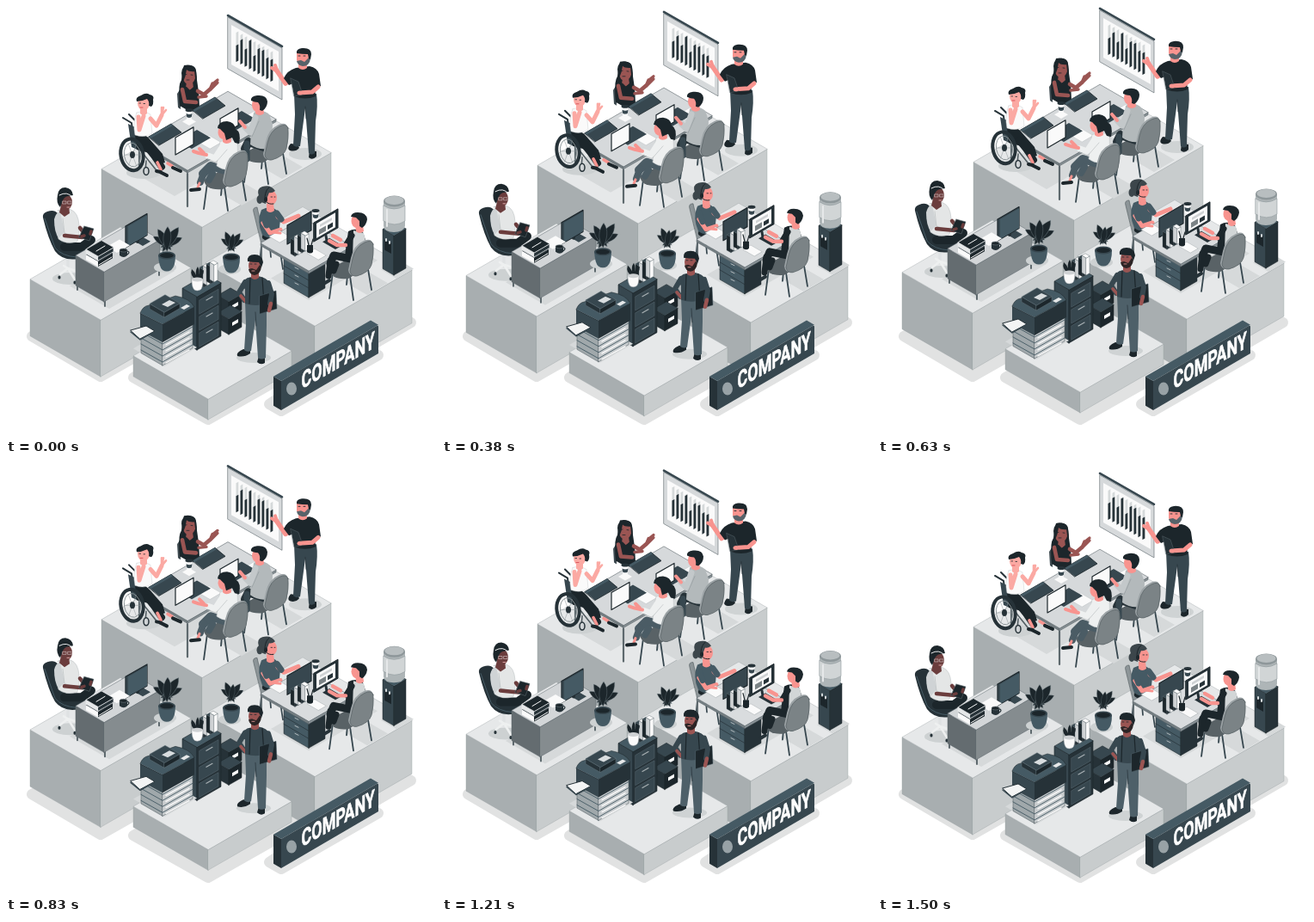
An HTML page for the animation above (1.54 s loop, 500 by 500 pixels).

```html
<!DOCTYPE html>
<html lang="en">
<head>
<meta charset="utf-8">
<title>Isometric office</title>
<style>
html, body { margin: 0; width: 100%; height: 100%; overflow: hidden; background: #fff; }
svg { display: block; width: 100%; height: 100%; }
text { font: 700 27px Roboto, Arial, sans-serif; fill: #fff; stroke: #fff; stroke-width: .7; }
</style>
</head>
<body>
<svg viewBox="0 0 500 500" stroke-linecap="round" stroke-linejoin="round">
  <g id="ground"></g>
  <g id="office"></g>
  <g id="sign"></g>
</svg>
<script>
const K = 0.577; // isometric slope
const INK = '#1c262b', DARK = '#263238', MID = '#37474f', SLATE = '#455a64', GREY = '#7b8386';
const PALE = '#e6e8e9', SOFT = '#cfd2d4', WHITE = '#fafafa', ROSE = '#f8948f', BLUSH = '#fba9a3', TAN = '#9a5553', BROWN = '#6b3d3d';
const FLOOR = [PALE, '#a8aeb0', '#c8cccd'], COAL = [SLATE, MID, DARK], STEEL = ['#d3d6d8', '#646c70', '#858c8f'];

let out = '';
const shape = (fill, d, more = '') => out += `<path fill="${fill}" d="${d}" ${more}/>`;
const line = (color, w, d) => shape('none', d, `stroke="${color}" stroke-width="${w}"`);
const oval = (fill, x, y, rx, ry = rx, more = '') => out += `<ellipse fill="${fill}" cx="${x}" cy="${y}" rx="${rx}" ry="${ry}" ${more}/>`;
// Faces start at their front corner: a runs up-left, b runs up-right, h runs down.
const flat = (fill, x, y, a, b, more) => shape(fill, `M${x} ${y}l${-a} ${-a * K} ${b} ${-b * K} ${a} ${a * K}z`, more);
const left = (fill, x, y, a, h, more) => shape(fill, `M${x} ${y}l${-a} ${-a * K}v${h}l${a} ${a * K}z`, more);
const right = (fill, x, y, b, h, more) => shape(fill, `M${x} ${y}l${b} ${-b * K}v${h}l${-b} ${b * K}z`, more);
function box(x, y, a, b, h, [top, side, front], more) {
  left(side, x, y, a, h, more);
  right(front, x, y, b, h, more);
  flat(top, x, y, a, b, more);
}
const block = (x, y, a, b, h) => box(x, y, a, b, h, FLOOR, 'stroke="#9aa1a4" stroke-width=".4"');
const shadow = d => shape('#e1e2e2', d, 'stroke="#e1e2e2" stroke-width="12"');
const shade = (x, y, a, b) => flat('#d6d9da', x, y, a, b);
const at = (x, y, draw) => { out += `<g transform="translate(${x} ${y})">`; draw(); out += '</g>'; };
function mount(id, draw) {
  out = '';
  draw();
  document.getElementById(id).innerHTML = out;
}

const seat = (x, y) => at(x, y, () => {
  shade(-6, 64, 26, 24);
  line(MID, 1.8, 'M-46 38l-4 30M-26 42l4 28M-5 34l4 24M-28 30l-2 22');
  shape('#596266', 'M-50 34l26-14 18 12-22 13q-20 2-22-11z');
});
const back = (x, y) => at(x, y, () => {
  shape('#9ba2a5', 'M1 5Q-1-3-10 1Q-22 6-25 21L-28 35Q-27 43-18 42Q-4 38-1 29Q2 17 1 5z');
  shape(GREY, 'M1 5Q-1-1-9 3Q-20 8-23 22L-26 36Q-25 43-18 42Q-4 38-1 29Q2 17 1 5z', 'stroke="#4e585c" stroke-width=".6"');
});

// Potted plant with leaves fanned out around the stem base.
function plant(x, y, leaves) {
  oval('#cdd1d2', x - 2, y + 27, 13, 6);
  for (const [turn, size] of leaves)
    shape(INK, 'M0 10C-4 2-9-10 2-24C9-14 6-2 0 10z', `transform="translate(${x} ${y}) rotate(${turn}) scale(${size})" stroke="#829096" stroke-width=".4"`);
  shape(SLATE, `M${x - 10} ${y + 13}q1 14 5 17 5 3 10 0 5-4 5-17z`);
  oval(MID, x, y + 13, 10, 4.5);
  oval(INK, x, y + 13, 8, 3);
}

function cup(x, y) {
  shape(WHITE, `M${x - 4} ${y}l1.4 11q2.6 2 5.2 0l1.4-11z`);
  shape(MID, `M${x - 3.5} ${y + 4}l.7 4q2.8 2 5.6 0l.7-4q-3 2-7 0z`);
  oval(DARK, x, y, 4.5, 2);
}

function binders(x, y, h) {
  for (let i = 0; i < 4; i++)
    box(x + 4 * i, y - 2 * i, 5, 4, h, i % 2 ? [WHITE, SOFT, WHITE] : [MID, INK, DARK], 'stroke="#59656a" stroke-width=".4"');
}

function board() {
  shape('#d6d9db', 'M258 13l63 36v60l-63-36z', 'stroke="#6e787c" stroke-width=".7"');
  shape(WHITE, 'M262 22l55 31v46l-55-31z');
  [19, 28, 20, 33, 18, 29, 30, 24, 25].forEach((h, i) => {
    const x = 267.5 + 5 * i, y = 65 + 5 * K * i;
    right('#d5d9da', x, y - 34, 2.8, 34);
    right(DARK, x, y - h, 2.8, h);
  });
  line(MID, 2.6, 'M258 11L321 47');
}

function presenter() {
  oval('#cfd3d4', 348, 172, 19, 7);
  shape(INK, 'M331 160l8 1 2 4q-4 5-11 3-4-2 1-8zM353 168l8 1 0 6q-5 5-9 1z');
  shape(MID, 'M335 102h26q2 14-1 32l-1 37q-4 3-7 0l-4-52-6 44q-5 2-8-1l2-36z');
  line(DARK, .8, 'M348 117l1 14');
  line(ROSE, 5.5, 'M331 86l-6 4-11-16');
  line(ROSE, 4, 'M315 75l-2-6M314 75l-5-3');
  shape(INK, 'M337 72l16-2q9 2 11 9l2 14-7 3 1 9q-12 5-25 0l1-16-7 3-6-8q4-9 14-12z');
  shape(ROSE, 'M340 66h10v6q-5 4-10 0z');
  line(ROSE, 5, 'M363 94l-7 6-15 1');
  shape(DARK, 'M331 84l9 4 5 15-10 2z', 'stroke="#5b676c" stroke-width=".5"');
  oval(ROSE, 342, 101, 3.5, 2.5);
  shape(ROSE, 'M338 54h15v10q-6 8-12 4l-3-5z');
  shape('#58636a', 'M338 64l5-1 4 2 5-5 2 1q-1 9-9 9-6-1-7-6z');
  shape(INK, 'M338 55q-1-5 6-6 11-1 11 7l-1 6-2-1-1-5q-7 0-13-1z');
  line(INK, .9, 'M340 58h2M346 58h2');
}

function listener() {
  shape('#3f4b51', 'M199 102l4-6v24l-3-2z');
  shape(INK, 'M207 69q8-2 13 3 2 5 2 14l2 14-10 8-12-2q-2-14 2-20 1-12 3-17z');
  shape(TAN, 'M206 74q7-3 13 1l1 9q-2 7-8 7-5-1-6-7z');
  shape(TAN, 'M210 88h7l1 7-5 3-4-3z');
  shape(INK, 'M204 78q0-8 8-9 8-1 9 7-8 1-11-2-1 8-4 14z');
  shape(INK, 'M203 93l7 1 4 4 4-4 6 3 1 21-9 6-14-8q-2-15 1-23z');
  line(TAN, 4.6, 'M223 99l7 4 7-6M205 97l3 14 13 1');
  line(TAN, 3.2, 'M237 97l3-7M238 97l8-8M237 97l6-8M241 90l5-4');
  line(TAN, 3.4, 'M224 106l9-1');
  line(INK, .8, 'M208 80l2-.6M215 80l2 .3M210 86h3');
}

function wheelchair() {
  oval('#cdd1d2', 160, 194, 20, 7);
  line(DARK, 2, 'M136 130l10 6 3 24M143 126l8 8');
  line('#525d62', 1.6, 'M150 160l16 20 8 10M163 180l-1 12');
  shape(MID, 'M142 137l8 4 5 27-9-4z');
  shape(INK, 'M150 150q10-4 18 6l14 16 3 10-6 2-9-12-18-5z');
  line(INK, 8, 'M164 164l8 10 9 13');
  line(ROSE, 3.6, 'M176 182l4 8M188 183l5 3');
  line(INK, 4, 'M180 193l-5-1M194 188l9 4M187 197l-8-4');
  shape(WHITE, 'M152 124q8-3 16 2l2 22q-9 6-20 2-3-15 2-26z', 'stroke="#cdd1d3" stroke-width=".5"');
  line(BLUSH, 5, 'M154 129l1 15 5-16M168 131l7 8 6-12');
  line(BLUSH, 2.6, 'M160 128l1-5M181 127l2-9M181 127l5-6M181 126l0-8');
  shape(BLUSH, 'M156 118h8v7q-4 4-8 0z');
  oval(BLUSH, 160, 113, 7, 8.5);
  shape(INK, 'M152 111q-2-5 5-7 6-4 10-1 6 1 4 6 1 5-2 8l-3-1q1-5-2-8-6 3-12 3z');
  line(INK, .8, 'M155 113h1.5M160 113.5h1.5');
  line('#d74f57', .9, 'M156 118h3');
  oval('none', 146.5, 173, 13, 18.5, `stroke="${DARK}" stroke-width="4" transform="rotate(-10 146 173)"`);
  oval('none', 147, 173, 9.5, 14, 'stroke="#8a9396" stroke-width=".9" transform="rotate(-10 147 173)"');
  for (let i = 0; i < 6; i++) line('#8a9396', .5, `M147 173l${9 * Math.cos(i * 1.047)} ${14 * Math.sin(i * 1.047)}`);
  oval(DARK, 147, 173, 3, 4);
  oval('#cfd3d5', 163, 192, 3, 4.5, `stroke="${DARK}" stroke-width="1.5"`);
}

function laptop(x, y) {
  flat(MID, x + 19, y + 11, 16, 22);
  right(WHITE, x, y - 2, 21, 20, `stroke="${INK}" stroke-width="1.2"`);
}
function darkLaptop(x, y) {
  shape(MID, `M${x - 20} ${y - 2}l26-15 12 10-26 15z`, `stroke="${INK}" stroke-width=".8"`);
  shape(SLATE, `M${x - 20} ${y - 2}l26-15 2 2-26 15z`);
}

function meetingTable() {
  line('#5e696e', 2.2, 'M155 162v30M211 195v38M262 162v26M300 140v22');
  box(211, 191, 56, 103, 3, ['#d6d9db', '#737d81', '#868f93'], 'stroke="#5e696e" stroke-width=".6"');
  darkLaptop(186, 154);
  darkLaptop(237, 123);
  cup(213, 121);
  flat(WHITE, 213, 139, 8, 8);
  flat(WHITE, 237, 166, 14, 13, 'stroke="#b9bec0" stroke-width=".4"');
  flat(WHITE, 285, 137, 11, 14, 'stroke="#b9bec0" stroke-width=".4"');
  laptop(197, 155);
  laptop(249, 133);
}

function colleague() {
  seat(327, 137);
  line(DARK, 10, 'M300 164l-18-6-4 8');
  line(MID, 7, 'M280 160l0 18');
  line(INK, 4, 'M278 183l-6 2');
  shape('#b3b9bb', 'M288 124q10-5 18 2l4 11-1 28q-14 4-25-4l1-16z');
  line('#c3c8ca', 7, 'M290 130l-6 17-6-6');
  line(ROSE, 4, 'M278 141l-6-7');
  line('#8f979a', .6, 'M294 134l-8 18');
  shape(ROSE, 'M290 117h9l1 8q-5 4-10 0z');
  oval(ROSE, 292, 115, 6, 8);
  shape(INK, 'M285 110q-1-5 7-6 11-1 12 7 0 7-6 11l-3-1q1-6-2-9-4 0-8-2z');
  back(327, 137);
}

function typist() {
  seat(280, 168);
  line('#4b5c65', 10, 'M258 192l-20-6-9 9');
  line('#4b5c65', 8, 'M230 194l-4 11M240 195l-4 7');
  line(ROSE, 3, 'M225 206l-2 5');
  line(INK, 4, 'M225 213l-10 1');
  shape('#eef0f0', 'M249 158q11-7 20 2l1 28q-14 6-25-2z', 'stroke="#b5bbbd" stroke-width=".4"');
  line('#eef0f0', 7, 'M252 163l-9 14-8-3');
  line('#b5bbbd', .6, 'M257 167l-13 15-10-4');
  line(ROSE, 4, 'M233 173l-9-2-6-2M230 171l-5-5');
  shape(ROSE, 'M252 149h9l1 9q-6 4-10 0z');
  oval(ROSE, 253, 147, 6.5, 8);
  shape(INK, 'M246 142q1-8 11-8 9 1 10 9 7 4 4 17l-5-1-3-6-7 3-2-8-5-5z');
  back(280, 168);
}

function meeting() {
  block(228, 257, 117, 150, 130);
  shade(196, 221, 50, 90);
  board();
  presenter();
  listener();
  meetingTable();
  wheelchair();
  colleague();
  typist();
}

function receptionist() {
  oval('#cdd1d2', 74, 317, 20, 7);
  line('#dfe2e3', 3.5, 'M72 287v20');
  line('#eef0f0', 2.6, 'M72 305l-9 7M72 305l8 13M72 305l12 4M72 305l-5-3');
  line(DARK, 3, 'M62 315v1M80 321v1M85 311v1');
  shape(DARK, 'M43 246q-1-5 5-7 8-3 12 2l10 35 22 6q2 8-8 12-18 3-27-9-8-14-14-39z');
  line(SLATE, 1, 'M45 247l12 34q8 10 25 11');
  line(INK, 10, 'M68 280l20 0 11-8');
  shape('#e4e6e6', 'M60 238q12-5 19 1 7 6 6 24l-2 11q-13 4-22-3-5-18 1-33z', 'stroke="#b9bfc1" stroke-width=".5"');
  shape('#cfd3d5', 'M56 248q2-8 7-9l5 24-7 7q-5-8-5-22z');
  line('#b9bfc1', .7, 'M66 247l2 17 9 3');
  line(BROWN, 4.5, 'M68 267l21 2M86 258l4 5');
  shape(INK, 'M91 256l11 3-5 14-12-4z', 'stroke="#59656a" stroke-width=".6"');
  line(BROWN, 3.5, 'M99 262l-1 3M88 268l3-1');
  shape(BROWN, 'M64 232h9l1 9-6 4-6-5z');
  oval(BROWN, 70, 228, 7, 9);
  shape(INK, 'M60 220q1-9 9-9 8 1 9 9l-5 1q-6 0-8 8l-2 5q-5-5-3-14z');
  line('#e8eaeb', 1, 'M62 220q9-5 15 2');
  line('#d5c6c6', .6, 'M66 227h4v3h-4zM72 227h4v3h-4z');
  line('#d9a0a0', 1, 'M71 234h3');
}

function reception() {
  block(110, 365, 82, 105, 66);
  shade(120, 352, 46, 76);
  receptionist();
  line('#5e696e', 2, 'M83 322v8M115 342v7M178 306v7');
  box(114, 309, 33, 65, 35, STEEL, 'stroke="#5e696e" stroke-width=".5"');
  flat(MID, 159, 279, 12, 9);
  line(DARK, 4, 'M153 274v-8');
  right(MID, 139, 256, 25, 25, `stroke="${INK}" stroke-width="1.2"`);
  right(SLATE, 142, 256, 22, 23);
  flat(WHITE, 129, 287, 12, 15);
  box(107, 297, 14, 17, 6, [DARK, WHITE, INK]);
  box(107, 291, 14, 18, 5, [INK, PALE, DARK], 'stroke="#e8eaeb" stroke-width=".7"');
  line(WHITE, 1, 'M105 285l10-6M108 301l15-9');
  shape(DARK, 'M132 284h9v6q-4 4-9 0z');
  oval(INK, 136.5, 284, 4.5, 2, 'stroke="#6e797e" stroke-width=".6"');
  line(DARK, 1.2, 'M141 285q4 1 0 4');
  plant(187, 277, [[-66, .75], [62, .8], [-36, .85], [30, 1], [-2, .85]]);
}

function caller() {
  line(MID, 1.7, 'M298 268l-3 30M318 280l4 26M306 270l2 22');
  shape('#8d9598', 'M288 240q-2-6 4-6l7 32 20 8-8 8-14-6z', 'stroke="#4e585c" stroke-width=".6"');
  line(INK, 8, 'M302 268l18 8-2 10');
  shape(SLATE, 'M297 237q11-6 18 1l4 10-2 20q-12 4-19-2-7-16-1-29z');
  line(ROSE, 5, 'M316 245l7 6 17-7M299 252l8 12 12-4');
  line(SLATE, 7, 'M315 241l5 7M299 245l4 10');
  shape(ROSE, 'M303 230h8l1 8q-5 4-9 0z');
  oval(ROSE, 308, 223, 7, 8.5);
  shape('#3c464b', 'M294 221q-3-9 4-11 10-3 15 5-4 3-7 2l-2 5-2 8q-8-2-8-9z');
  oval('#3c464b', 295, 225, 3.5, 5);
  line(INK, 1, 'M301 222q1-9 5-11M303 228q3 3 8 2');
  oval(INK, 302, 225, 2, 3);
  line(INK, .8, 'M308 222h1.5M312 222h1');
}

function worker() {
  seat(426, 272);
  line(INK, 9, 'M401 294l-20-4-4 10');
  line(INK, 7, 'M377 296l-2 18M384 300l-3 8');
  line(DARK, 4, 'M376 319l-5 3');
  shape(INK, 'M398 262q9-5 17 1l4 12-2 20q-12 4-23-5z');
  shape('#d2d6d7', 'M404 261l12 3 3 14-2 17q-8 3-14-2z');
  line(INK, 7, 'M402 267l-6 10');
  line(ROSE, 4.4, 'M395 278l-10 0-9-5M389 272l-9-5');
  shape(ROSE, 'M406 254h9l1 8q-5 4-9 0z');
  oval(ROSE, 408, 250, 6.5, 8);
  shape(INK, 'M401 245q1-5 8-5 10 0 11 8-1 7-6 10l-3-2 0-6-4-4z');
  back(426, 272);
}

function cooler() {
  shade(454, 317, 18, 20);
  box(451, 267, 13, 14, 46, COAL, `stroke="${INK}" stroke-width=".5"`);
  left(INK, 448, 276, 8, 12);
  line('#d5dadc', 2, 'M442 271v2M446 274v2');
  shape('#aeb5b7', 'M439 227v29q1 7 12 7t13-7v-29z');
  shape('#d1d5d6', 'M439 232q12 8 25 0v18q-12 8-25 0z', 'stroke="#8e979a" stroke-width=".6"');
  oval('#8e979a', 451.5, 227, 12.5, 6.5);
  oval('#b8bec0', 451.5, 226, 11, 5);
  line(PALE, 2, 'M443 237v19');
}

function workstation() {
  block(359, 372, 127, 113, 62);
  shade(352, 342, 44, 80);
  plant(262, 279, [[-60, .6], [58, .65], [-28, .75], [30, .75], [4, .6]]);
  cooler();
  caller();
  line('#5e696e', 2, 'M297 279v17M401 283v22M350 262v30');
  box(352, 310, 29, 19, 29, [MID, SLATE, DARK], `stroke="${INK}" stroke-width=".5"`);
  line(DARK, .7, 'M323 302l29 17M323 311l29 17');
  line(SOFT, .8, 'M336 304l4 2M336 313l4 2M336 322l4 2');
  box(352, 308, 56, 50, 3, ['#d9dcde', '#747e82', '#8b9498'], 'stroke="#5e696e" stroke-width=".5"');
  flat(WHITE, 318, 275, 12, 12, 'stroke="#9aa2a5" stroke-width=".4"');
  line(ROSE, 3, 'M310 263l9 1');
  cup(360, 238);
  right(DARK, 358, 252, 28, 22, `stroke="${INK}" stroke-width="1"`);
  right(WHITE, 361, 253, 22, 17);
  right(SOFT, 365, 254, 14, 3);
  right(GREY, 364, 260, 8, 6);
  right(DARK, 374, 255, 6, 5);
  line(DARK, 3, 'M372 267l1 6');
  flat(MID, 341, 275, 8, 8);
  right(MID, 327, 255, 28, 22, `stroke="${INK}" stroke-width="1.2"`);
  flat(DARK, 383, 283, 15, 8);
  flat(WHITE, 363, 295, 13, 9, 'stroke="#9aa2a5" stroke-width=".4"');
  binders(336, 273, 18);
  shape(INK, 'M350 278h7v8q-3 3-7 0z');
  line(INK, 1.2, 'M352 278l-2-8M355 278l2-7');
  worker();
}

function printer() {
  shade(184, 419, 36, 38);
  box(182, 382, 25, 35, 36, ['#cfd3d5', '#a0a8ab', '#c9cdcf'], 'stroke="#5e696e" stroke-width=".6"');
  for (let y = 393; y < 416; y += 7) {
    line(SLATE, .9, `M157 ${y - 14}l25 14 35-20`);
    line(WHITE, 1.4, `M186 ${y + 1}l27-15`);
  }
  shape(DARK, 'M182 370l37-20v20l-37 21z');
  shape(MID, 'M156 357l26 13v21l-26-14z');
  shape(SLATE, 'M156 357q3-8 10-9l31-11q17 3 22 13l-37 20z', `stroke="${INK}" stroke-width=".5"`);
  box(184, 356, 17, 18, 6, [MID, DARK, INK], 'stroke="#62727a" stroke-width=".5"');
  shape('#d9dddf', 'M181 347l9-5 7 3-9 5z');
  shape(PALE, 'M203 351l7-4 4 2-7 4z');
  shape('#f3f4f4', 'M145 377l18-5 10 6-17 9z', `stroke="${DARK}" stroke-width="1"`);
  line(MID, 1.4, 'M145 379l11 9 16-9');
}

function cabinet() {
  for (const y of [344, 364]) {
    box(259, y, 13, 15, 18, [MID, DARK, INK], `stroke="${INK}" stroke-width=".5"`);
    right(WHITE, 263, y + 4, 7, 4);
  }
  box(222, 338, 17, 28, 62, [SLATE, MID, DARK], `stroke="${INK}" stroke-width=".6"`);
  for (let i = 0; i < 3; i++) {
    right(MID, 225, 342 + i * 19, 22, 16, 'stroke="#5b6a72" stroke-width=".5"');
    line('#a8b0b3', 1.2, `M233 ${342 + i * 19}l7-4`);
  }
  binders(230, 307, 20);
  for (const d of ['q-9-5-6-13 6 5 6 13', 'q-3-11 1-16 4 7-1 16', 'q1-9 8-12 0 8-8 12'])
    shape(INK, 'M222 319' + d + 'z');
  shape(WHITE, 'M216 318h13q0 10-3 12-4 2-7 0-3-3-3-12z', 'stroke="#aab1b4" stroke-width=".5"');
  oval(SOFT, 222.5, 318, 6.5, 2.5);
}

function visitor() {
  oval('#cfd3d4', 288, 409, 20, 6);
  shape(INK, 'M276 399l8 1 0 4q-7 5-15 3-2-4 7-8zM294 407l7 0 0 8q-5 3-9-1z');
  shape('#4e6069', 'M278 343h25l0 28-1 38q-5 3-9 0l-3-44-5 36q-5 2-8-1l2-30z');
  line(DARK, .7, 'M290 356l1 16');
  line(MID, 6, 'M278 321l-7 12 6 9');
  line(TAN, 3.6, 'M273 337l6 7');
  shape(MID, 'M281 316l12-2q11 2 13 8l1 12-4 12q-13 4-25 0l0-17-4-2q2-9 7-11z');
  line(INK, 1.2, 'M284 316l-1 30M298 316l2 30');
  shape(INK, 'M295 337l19-6 1 21-20 6z', 'stroke="#4e6069" stroke-width=".5"');
  line(MID, 6, 'M305 322l4 13-2 11');
  line(TAN, 4.5, 'M308 346l-2 8');
  shape(TAN, 'M285 308h9v8q-5 4-9 0z');
  oval(TAN, 289, 302, 7, 9);
  shape('#2c2425', 'M282 306l4-1 5 2 4-6 2 2q-1 9-8 10-6-1-7-7z');
  shape(INK, 'M281 297q-1-8 8-8 9 0 10 9l-2 6-3-6q-7 0-13-1z');
  line(INK, .8, 'M284 300h2M289 300h2');
  line('#c98784', 1, 'M286 308h3');
}

function lobby() {
  block(235, 457, 87, 97, 24);
  cabinet();
  printer();
  visitor();
}

function sign() {
  left(DARK, 320, 436, 9, 34);
  flat(SLATE, 320, 436, 9, 113);
  shape(MID, 'M320 436L431 372q2-1 2 1v31L320 470z');
  oval('#98a2a6', 332, 445, 6, 7.5);
  out += '<text transform="matrix(.665 -.378 0 1 343.5 445.5)">COMPANY</text>';
}

mount('ground', () => {
  shadow('M30 384L110 431L200 380L110 340z');
  shadow('M148 432L235 481L332 426L240 380z');
  shadow('M300 399L359 433L471 368L400 330z');
  shadow('M306 463L320 471L433 406L400 400z');
});
mount('office', () => { meeting(); reception(); workstation(); lobby(); });
mount('sign', sign);

const LOOP = 1540, STEPS = 37, LIFT = 8.8;
const office = document.getElementById('office');
function frame(now) {
  const step = Math.floor((now % LOOP) * STEPS / LOOP + 0.1);
  const lift = LIFT * (1 - Math.cos(2 * Math.PI * step / STEPS)) / 2;
  office.setAttribute('transform', `translate(0 ${-lift.toFixed(2)})`);
  requestAnimationFrame(frame);
}
frame(0);
</script>
</body>
</html>
```
